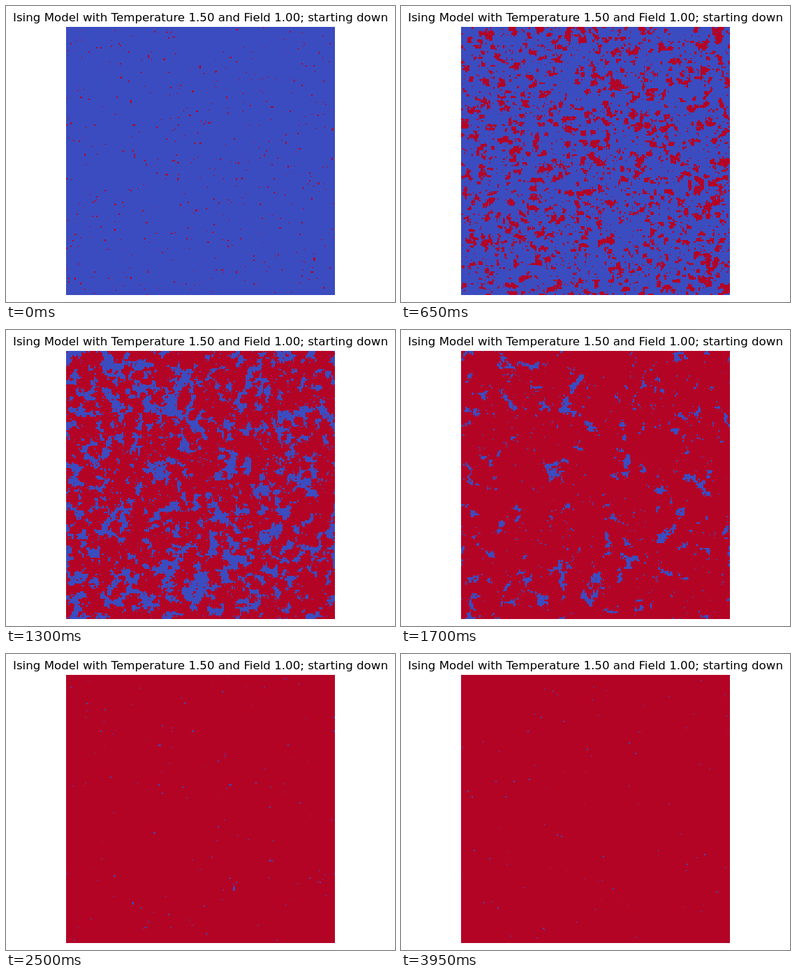
These frames come from a looping animation (557 px wide and 425 px high, 4 s). An HTML page with a canvas:

```html
<!DOCTYPE html>
<html lang="en">
<head>
<meta charset="utf-8">
<title>Ising Model</title>
<style>
  html, body { margin: 0; width: 100%; height: 100%; overflow: hidden; background: #fff; }
  svg { position: absolute; left: 0; top: 0; }
  text { font: 16.667px "DejaVu Sans", sans-serif; }
  canvas { position: absolute; left: 86px; top: 30px; width: 385px; height: 385px; image-rendering: pixelated; }
</style>
</head>
<body>
<svg width="557" height="425"><text x="278.5" y="22" text-anchor="middle">Ising Model with Temperature 1.50 and Field 1.00; starting down</text></svg>
<canvas id="lattice" width="250" height="250"></canvas>
<script>
const N = 250, FRAMES = 80, FRAME_MS = 50, TRIALS = N * N / 2;
const TEMPERATURE = 1.5, FIELD = 1;
const UP = 0xff2604b4, DOWN = 0xffc04c3b; // ABGR

// Seeded generator, so every load gives the same run
let seed = 12345;
function random() {
  seed = (seed + 0x6d2b79f5) | 0;
  let t = Math.imul(seed ^ (seed >>> 15), 1 | seed);
  t = (t + Math.imul(t ^ (t >>> 7), 61 | t)) ^ t;
  return ((t ^ (t >>> 14)) >>> 0) / 4294967296;
}

const spins = new Int8Array(N * N).fill(-1);

// Metropolis trial at a random site with periodic borders
function trial() {
  const x = Math.floor(random() * N), y = Math.floor(random() * N);
  const row = y * N, site = row + x;
  const neighbours = spins[row + (x + 1) % N] + spins[row + (x + N - 1) % N]
    + spins[(y + 1) % N * N + x] + spins[(y + N - 1) % N * N + x];
  const cost = 2 * spins[site] * (neighbours + FIELD);
  if (cost <= 0 || random() < Math.exp(-cost / TEMPERATURE)) spins[site] *= -1;
}

const frames = Array.from({ length: FRAMES }, () => {
  for (let i = 0; i < TRIALS; i++) trial();
  return spins.slice();
});

const ctx = document.getElementById("lattice").getContext("2d");
const image = ctx.createImageData(N, N);
const pixels = new Uint32Array(image.data.buffer);
let shown = -1;

function draw(index) {
  if (index === shown) return;
  shown = index;
  frames[index].forEach((spin, i) => { pixels[i] = spin > 0 ? UP : DOWN; });
  ctx.putImageData(image, 0, 0);
}

const start = performance.now();
function tick() {
  draw(Math.floor((performance.now() - start) / FRAME_MS) % FRAMES);
  requestAnimationFrame(tick);
}
tick();
</script>
</body>
</html>
```
